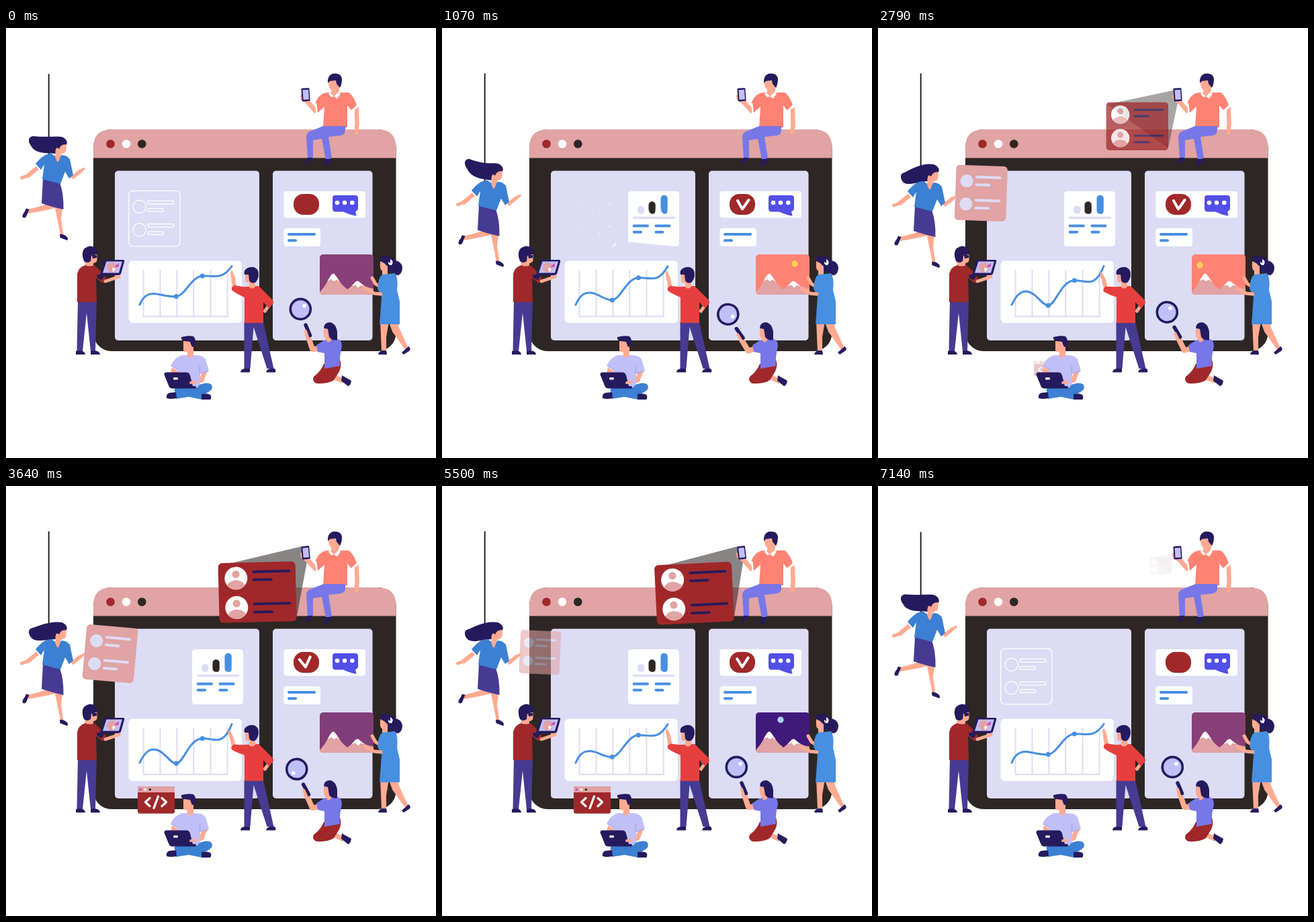
An HTML page that plays this animation: 640 px wide and 640 px high, repeating every 7210 ms.

```html
<!DOCTYPE html>
<html lang="en">
<head>
<meta charset="utf-8">
<title>Team building a dashboard</title>
<style>
html, body { margin: 0; width: 100%; height: 100%; overflow: hidden; background: #fff; }
svg { display: block; width: 100%; height: 100%; }
.ln { fill: none; stroke-linecap: round; stroke-linejoin: round; }
.skin { fill: #ffaa91; } .navy { fill: #261a5e; } .dark { fill: #2d2624; } .pink { fill: #e1a3a4; }
.pale { fill: #dcdcf5; } .wine { fill: #a0282a; } .blue { fill: #478fe0; } .jean { fill: #3b80d2; }
.plum { fill: #473a93; } .lilac { fill: #7777e8; } .coral { fill: #ff8272; } .red { fill: #e63f3d; }
.soft { fill: #c0bff8; } .white { fill: #fff; }
.limb { fill: none; stroke: #ffaa91; stroke-linejoin: round; }
</style>
</head>
<body>
<svg viewBox="0 0 640 640">
  <defs>
    <clipPath id="frame"><rect x="467" y="337" width="80" height="60" rx="5"/></clipPath>
    <clipPath id="disc1"><circle cx="341.500" cy="135" r="17"/></clipPath>
    <clipPath id="disc2"><circle cx="341.500" cy="178.500" r="17"/></clipPath>
  </defs>

  <!-- browser window -->
  <rect class="dark" x="130" y="151" width="450.500" height="330" rx="27"/>
  <path class="pink" d="M130 193.500V178Q130 151 157 151H553.500Q580.500 151 580.500 178V193.500Z"/>
  <circle class="wine" cx="155.500" cy="172.500" r="6.300"/>
  <circle class="white" cx="179" cy="172.500" r="6.300"/>
  <circle class="dark" cx="202.300" cy="172.500" r="6.300"/>
  <rect class="pale" x="162" y="212.500" width="215" height="252.500" rx="5"/>
  <rect class="pale" x="397" y="212.500" width="148.500" height="252.500" rx="5"/>

  <!-- right column -->
  <rect class="white" x="413.500" y="243" width="121.500" height="39.500" rx="4"/>
  <rect class="wine" x="428" y="247" width="38" height="31" rx="14.500"/>
  <path id="check" class="ln" stroke="#fff" stroke-width="4" pathLength="1" d="M440 257L447 269.500L456.500 256"/>
  <path fill="#514fe8" d="M490 249H520Q524 249 524 253V268Q524 272 520 273L521.500 279.500Q515 279 502 273.500H490Q486 273 486 269V253Q486 249 490 249Z"/>
  <g class="white"><circle cx="493" cy="260" r="3.300"/><circle cx="504" cy="260" r="3.300"/><circle cx="515.300" cy="260" r="3.300"/></g>
  <rect class="white" x="413.500" y="298" width="54.500" height="27" rx="4"/>
  <path class="ln" stroke="#478fe0" stroke-width="4" d="M421 307H459M421 316.300H431"/>
  <g clip-path="url(#frame)">
    <rect id="sky" x="467" y="337" width="80" height="60"/>
    <circle id="sun" fill="#ffcf5c" r="4.700"/>
    <circle id="moon" fill="#a9d2f5" r="4.700"/>
    <path class="pink" d="M466 397V394Q471 389 475 383L483 369Q487 362 491 369L497 378Q502 385 508 389Q513 386 519 379Q523 374 527 379Q534 386 548 388V397Z"/>
    <path class="white" d="M478.500 376.500L483 369Q487 362 491 369L497 378L492 374.500L488 377L484 374ZM514.500 384L519 379Q523 374 527 379L533.500 384L528 383L524 386.500L520 382.500Z"/>
  </g>

  <!-- left column -->
  <g id="outline" fill="none" stroke="#fff" stroke-width="1.300"></g>
  <path id="statCard" class="white"/>
  <g id="bars"><path class="pale"/><path class="dark"/><path class="blue"/></g>
  <g id="statText" class="ln" stroke-width="4">
    <path stroke="#dcdcf5" stroke-width="3.300" d="M285.500 282.300H345.500"/>
    <path stroke="#478fe0" d="M285.700 294.500H306M318.500 294.500H338.500M285.700 303.800H296M318.500 303.800H328.500"/>
  </g>
  <rect class="white" x="182.500" y="346.500" width="168.500" height="92.500" rx="6"/>
  <path fill="none" stroke="#dcdcf5" stroke-width="2" d="M204.500 360V430M229.500 360V430M254.500 360V430M279.300 360V430M304.500 360V430M329.700 360V430M203.500 429.300H330.700"/>
  <path id="curve" class="ln" stroke="#478fe0" stroke-width="3"/>
  <circle id="dotA" class="blue" cx="253.300" r="3.500"/>
  <circle id="dotB" class="blue" cx="292.300" r="3.500"/>

  <!-- card in the hand of the hanging woman -->
  <g id="handCard">
    <rect class="pink" x="114" y="202.500" width="76.500" height="82" rx="5.500"/>
    <g class="pale"><circle cx="130.300" cy="226" r="9.600"/><circle cx="130.300" cy="260.300" r="9.600"/></g>
    <path class="ln" stroke="#dcdcf5" stroke-width="4" d="M145 219.500H179.500M145 231H163.500M145 254H179.500M145 265.500H163.500"/>
  </g>

  <!-- hanging woman -->
  <path id="wire" stroke="#222" stroke-width="2"/>
  <g id="hanger">
    <path class="limb" stroke-width="6.500" d="M47 208L31 221"/>
    <path class="limb ln" stroke-width="5" d="M32 220L23.500 223"/>
    <path class="limb" stroke-width="5.500" d="M98 223L112 212"/>
    <path class="limb ln" stroke-width="3.500" d="M111 213L116 209.500"/>
    <path class="skin" d="M56 260L84 266L82 285L85.500 309L81 308L73 268Q58 272 33 276L32 270Q50 266 64 261Z"/>
    <path class="navy" d="M34.500 270L30 281Q27 284 24.500 281Q24 278 28 273L30 268.500ZM80 307Q85 306 91 311Q93 314 91 316L80.500 312Z"/>
    <path class="plum" d="M55 224L80 230Q86 246 85.500 270Q67 266 53 261Z"/>
    <path id="hair" class="navy"/>
    <path class="jean" d="M68 187Q78 196 83 189Q90 189 95 195L100 219L94 224L88 214L81 232L54 225L57 203L52 211L44 202Q57 186 68 187Z"/>
    <path class="skin" d="M89.500 172Q90.500 184 87 186Q82 186.500 81.500 190Q79 198 77 200Q72 193 73.500 188L73.500 180Q75 176 79 179L81 174Z"/>
    <path class="navy" d="M70 165Q82 158 89 166Q92 170 90 173.500Q82 172 79 180Q75 176 74 181L72 187Z"/>
  </g>

  <!-- man with the small laptop -->
  <path class="plum" d="M107 405H135L133 481H126L120 424L114 481H105.500Z"/>
  <path class="navy" d="M104 486V481Q112 479 116 482Q118 484 118 486ZM126 486V481Q134 479 138 482Q140 484 140 486Z"/>
  <path class="skin" d="M118 347H130V355Q123 359 117 354Z"/>
  <path class="skin" d="M122 337H135.500V346Q134 351 126 350Z"/>
  <path class="navy" d="M116 347Q111 334 117 328Q126 321 134 328Q138 333 134 337L127 339L126 347Q121 351 116 347ZM128 338H135V342L129 343Z"/>
  <path class="wine" d="M118 353Q124 356 131 353Q137 356 149 373L144 380L134 372L135 408H106V366Q108 356 118 353Z"/>
  <path class="navy" d="M148 345H175Q177 346 176 348L171 366Q170 368 167 368H143Q138 368 142 362L146 347Q147 345 148 345ZM136 367H147L143 375Q135 373 135 369Z"/>
  <path fill="#c0bff8" d="M149.500 347.500H173L168 364.500H144Z"/>
  <circle class="pink" cx="157.500" cy="356.500" r="7.500"/>
  <path class="white" d="M158 357L163 358Q162 362 159 363Z"/>
  <path fill="#d63fc4" d="M161.500 355L168 350L167.500 356Z"/>
  <path class="limb ln" stroke-width="5" d="M148 377L160 373L168 370"/>

  <!-- code window rising from the laptop -->
  <g id="codeWin">
    <rect class="wine" x="196" y="447" width="55" height="40.500" rx="3"/>
    <path class="pink" d="M196 456V450Q196 447 199 447H248Q251 447 251 450V456Z"/>
    <circle fill="#c84bbb" cx="200.300" cy="451.800" r="1.800"/><circle class="white" cx="207.300" cy="451.800" r="1.800"/><circle class="dark" cx="214.300" cy="451.800" r="1.800"/>
    <path class="ln" stroke="#fff" stroke-width="3.300" d="M214 464.500L207.500 470.500L214 476.500M226.500 462L220 479.500M232 464.500L238.500 470.500L232 476.500"/>
  </g>

  <!-- sitting man with laptop -->
  <path class="jean" d="M253 535L285 532Q299 526 305 530Q308 533 306 538Q300 544 291 546L292 553L272 549L253 552V543Q248 539 253 535Z"/>
  <path class="navy" d="M253 542L254 551Q245 553 239 551Q238 545 243 543ZM291 545Q302 543 305 547Q306 551 304 553H291Z"/>
  <path class="limb ln" stroke-width="7" d="M296 511L291 524L278 529"/>
  <path class="skin" d="M247 505L256 511V515L245 514Z"/>
  <path class="soft" d="M262 487H280Q293 486 297 493L302 510L289 513V530L285 535H262L255 514V508L245 503Q251 490 262 487Z"/>
  <path fill="none" stroke="#a9a7e8" stroke-width="1.500" d="M288.500 502V514L301 511M247 503L256 509"/>
  <path class="skin" d="M264 466H279V487Q276 492 270 489V482Q265 483 264 480Z"/>
  <path class="navy" d="M261 460Q272 457 279 459Q284 463 281 473L277 475L275 470L274 467L265 466Q260 464 261 460Z"/>
  <path class="navy" d="M238 512.500H269Q273 513 274 517L278 533H282Q284 535 282 536.500H247Q243 536 242 532L235.500 516Q235 513 238 512.500Z"/>
  <path class="limb ln" stroke-width="4" d="M275 528L282 527"/>
  <rect class="white" x="249" y="520" width="7" height="3.500" rx="1.500"/>

  <!-- man at the chart -->
  <path class="plum" d="M354.500 437H383Q386 452 398.500 507H388.500L368.500 445L363.500 507H354.500Z"/>
  <path class="navy" d="M349 512.500Q349 508 355 507H363V512.500ZM387 512.500Q388 508 393 507H400Q402 510 401 512.500Z"/>
  <path class="limb" stroke-width="5" d="M393 411L384 423"/>
  <g id="redArm">
    <path class="skin" d="M337 386L334 365Q334 361 337 361L341 372L343 386Z"/>
    <path class="red" d="M336 386L340 383L358 386L359 402Q346 398 336 390Z"/>
  </g>
  <path class="red" d="M358 385L376 384L397 405Q399 408 397 411L391 417L383 408V439H355V402L351 386Z"/>
  <path class="skin" d="M356 367H371V385Q367 390 362 386V379Q357 380 356 376Z"/>
  <path class="navy" d="M355 367Q353 360 360 357Q370 353 375 361Q378 370 372 378Q366 382 362 376L361 367Z"/>

  <!-- kneeling woman -->
  <path class="limb" stroke-width="7" d="M488 519L503 526"/>
  <path class="navy" d="M500 517L514 525Q513 532 509 533L499 525Z"/>
  <path class="wine" d="M473 500L496 492Q501 500 496 511L488 524Q480 530 462 529Q455 526 458 519Q468 512 473 500Z"/>
  <g id="lens">
    <path class="limb ln" stroke-width="8" d="M467 477L456 478L449 457"/>
    <path class="ln" stroke="#261a5e" stroke-width="5.500" d="M446 442L452.500 457.500"/>
    <path class="limb ln" stroke-width="4" d="M446 451L449 460"/>
    <circle fill="#c0bff8" stroke="#261a5e" stroke-width="3.600" cx="438.300" cy="418.400" r="15"/>
  </g>
  <circle id="glint" class="white" r="2.800"/>
  <path class="lilac" d="M473 465Q483 461 492 463Q500 463 500 474Q496 488 497 503L474 507V484L464 482L462 472Z"/>
  <path class="skin" d="M473 448H484V465Q479 471 476 463Q472 460 473 448Z"/>
  <path class="navy" d="M473 447Q473 438 483 438Q491 440 493 452V464Q486 466 481 460L479 448Z"/>

  <!-- woman at the picture -->
  <path class="skin" d="M557 436H570L566 460V482H559ZM570 438H583L585 446L599 477L595 480L575 452Z"/>
  <path class="navy" d="M554 486Q555 481 560 480H566L567 486ZM589 483L599 474Q603 476 601 480L592 486Z"/>
  <path class="limb ln" stroke-width="5" d="M558 386L550 381L545 372"/>
  <path class="navy" d="M557 346Q556 338 566 339Q576 341 579 346Q588 347 590 356Q590 365 584 368Q577 368 574 361L566 365L561 351Z"/>
  <path class="skin" d="M557 347L563 350L568 355V367Q565 372 560 369V361Q556 361 557 347Z"/>
  <path class="white" d="M572 344Q578 347 574 353Q568 353 569 348L572 350Z"/>
  <path class="blue" d="M560 367L579 365Q584 372 582 390L586 407V441H556L559 400L553 388Q554 371 560 367Z"/>
  <path class="limb ln" stroke-width="5" d="M558 396L548 395L535 388"/>

  <!-- phone projection -->
  <g id="beam"><path class="dark" opacity=".56" d="M440 90L317 116L430 197L449 107Z"/></g>
  <g id="phoneCard">
    <rect class="wine" x="315.300" y="112" width="115" height="89" rx="6"/>
    <g class="white"><circle cx="341.500" cy="135" r="17"/><circle cx="341.500" cy="178.500" r="17"/></g>
    <g class="pink">
      <circle cx="341.500" cy="129" r="5.600"/><ellipse clip-path="url(#disc1)" cx="341.500" cy="149" rx="14" ry="11"/>
      <circle cx="341.500" cy="172.500" r="5.600"/><ellipse clip-path="url(#disc2)" cx="341.500" cy="192.500" rx="14" ry="11"/>
    </g>
    <path class="ln" stroke="#261a5e" stroke-width="3.800" d="M368 126H420.500M368 138H394M368 174H420.500M368 186H394"/>
  </g>

  <!-- man with phone -->
  <path class="limb" stroke-width="7" d="M462 125L449 110"/>
  <path class="limb ln" stroke-width="4" d="M449 112L441 106L440 101"/>
  <g id="phone">
    <rect class="navy" x="440" y="89.500" width="12" height="19.500" rx="1.500" transform="rotate(-4 446 99)"/>
    <rect class="soft" x="442" y="92" width="8.500" height="14.500" transform="rotate(-4 446 99)"/>
  </g>
  <path class="limb ln" stroke-width="6.500" d="M522 121L522.500 143L521.500 155"/>
  <path class="coral" d="M480 96H510Q515 98 522 114L514 123L508 115V148H472L474 117L463 127L460 113Q466 96 480 96Z"/>
  <path fill="none" stroke="#fff" stroke-width="2.500" d="M514 123L523 117.500M461 112L463 128"/>
  <path class="white" d="M482 95L488 102L496 94L498 98L493 105L488 102L484 103L480 98Z"/>
  <path class="skin" d="M480 79L492 78L496 80V94L488 102L484 95V91Q480 91 480 79Z"/>
  <path class="navy" d="M479 82Q478 71 486 68Q498 66 500 75Q500 84 497 89L492 83L491 78L482 79Z"/>
  <path class="lilac" d="M472 146H505V153Q504 159 498 160L480 162L485 194L476 196L470 165L457 167V194H449L447 162Q447 157 452 154Z"/>
  <path class="navy" d="M449 193H456Q455 199 446 203Q444 201 449 193ZM476 195H485Q484 201 475 207Q473 204 476 195Z"/>
</svg>
<script>
const LOOP = 7210, STEP = LOOP / 101;
const $ = id => document.getElementById(id);
const set = (el, attrs) => { for (const k in attrs) el.setAttribute(k, attrs[k]); };
const clamp = v => Math.max(0, Math.min(1, v));
const mix = (a, b, k) => a + (b - a) * k;

// ease in and out with the given power
function ease(u, power) {
  u = clamp(u);
  const half = v => Math.pow(2 * v, power) / 2;
  return u < .5 ? half(u) : 1 - half(1 - u);
}
const span = (t, from, to, power = 2) => ease((t - from) / (to - from), power);
// fades in over a..b and out over c..d
const between = (t, a, b, c, d, power) => span(t, a, b, power) - span(t, c, d, power);

function track(t, keys, power = 1) {
  let i = 0;
  while (i < keys.length - 2 && t > keys[i + 1][0]) i++;
  const [t0, a] = keys[i], [t1, b] = keys[i + 1];
  return mix(a, b, ease((t - t0) / (t1 - t0), power));
}

const TRACKS = {
  hair: [[0, 0], [450, -9], [1070, -6], [1800, 9], [2790, 13], [3640, 9], [4300, 11], [4710, 9], [5400, 11], [6140, 11], [7210, 0]],
  lens: [[0, 0], [1000, -12.4], [2400, -12.4], [2790, -7.7], [3640, -5.3], [4710, 0], [7210, 0]],
  glint: [[0, -40], [1070, 23], [2790, 309], [3640, 490], [4710, 680], [7210, 680]],
  curve: [[0, 0], [400, 0], [1070, .4], [1900, 1], [3640, 1], [4710, .88], [5950, 0], [7210, 0]],
  sky: [[0, .42], [100, .42], [800, 1], [3180, 1], [3930, 0], [5300, 0], [6140, .29], [6700, .42], [7210, .42]],
  check: [[0, 0], [2790, 0], [3640, 1], [4710, 1], [5900, 0]],
  handTilt: [[1200, 0], [2790, 2], [3640, 5], [4710, 0], [5800, 3]],
  phoneTilt: [[0, 0], [2790, 0], [3640, -1.4], [4710, -5.2], [6140, -1], [6800, 0], [7210, 0]]
};

// rounded box traced clockwise from its lower right corner
const box = (x, y, w, h, r) => `M${x + w} ${y + h - r}a${r} ${r} 0 0 1 ${-r} ${r}h${2 * r - w}` +
  `a${r} ${r} 0 0 1 ${-r} ${-r}v${2 * r - h}a${r} ${r} 0 0 1 ${r} ${-r}h${w - 2 * r}a${r} ${r} 0 0 1 ${r} ${r}Z`;

const outlines = [box(182.700, 242.300, 76.300, 82.500, 6)];
for (const y of [266, 300.300]) {
  outlines.push(box(189, y - 9.700, 19.400, 19.400, 9.700), box(211, y - 8.600, 39, 4.600, 2.200), box(211, y + 2.800, 23.500, 4.400, 2.200));
}
$('outline').innerHTML = outlines.map(d => `<path pathLength="1" d="${d}"/>`).join('');

const barSizes = [[291, 12], [307.500, 18.500], [325.500, 28]];
function barPath([x, h], grow) {
  const w = 10.300, r = 5, base = 276.700, top = base - h * clamp(grow * 1.12);
  const round = Math.pow(grow, 8), tall = Math.max(base - top, 2 * r);
  return `M${x} ${base - tall + r}a${w / 2} ${r} 0 0 1 ${w} 0L${x + w * mix(.9, 1, round)} ${base - r}` +
    `Q${x + w * mix(.85, 1, round)} ${base} ${x + w * .6} ${base}Q${x + w * .4 * (1 - round)} ${base} ${x} ${base - mix(tall - r, r, round)}Z`;
}

function statPath(grow) {
  const right = 243 + 82 * clamp(grow * 1.15), left = 243 + 82 * Math.pow(grow, 2.5);
  const r = Math.min(5, (right - 243) / 2), l = Math.min(5, (left - 243) / 2), c = 5 * Math.pow(grow, 20);
  return `M277 ${243 + l}Q277 243 ${277 + l} 243H${353 - r}Q353 243 353 ${243 + r}V${right - r}` +
    `Q353 ${right} ${353 - r} ${right - r * .1 * (1 - grow)}L${277 + c} ${left}Q277 ${left} 277 ${left - c}Z`;
}

const hairPath = h => `M90 173C91 165 84 161 75 161.500C63 162 52 ${162 + h * .4} 40 ${161 + h}` +
  `C32 ${162 + h} 33 ${170 + h} 37 ${175 + h}C43 ${187 + h * .6} 58 ${186 + h * .2} 74 187C78 178 80 181 90 173Z`;

const chartLow = k => mix(399.600, 413, k), chartHigh = k => mix(369, 375.700, k);
function curvePath(k) {
  const m = (a, b) => mix(a, b, k), low = chartLow(k), high = chartHigh(k);
  return `M199 412C${m(204, 206)} ${m(399, 398)} 211 ${m(395, 392)} 221 ${m(395.500, 392)}` +
    `C${m(232, 235)} ${m(396.500, 393)} ${m(241, 244)} ${m(400.500, 413)} 253.300 ${low}` +
    `C${m(267, 264)} ${m(398, 413)} ${m(276, 273)} ${m(370, 375.500)} 292.300 ${high}C${m(309, 308)} ${m(368, 375)} ${m(321, 323)} ${m(376, 389)} 336 354.500`;
}

const scaleAt = (x, y, s) => `translate(${x} ${y}) scale(${s}) translate(${-x} ${-y})`;

function orb(id, t, start) {
  const x = 525 - .0268 * (t - start);
  set($(id), { cx: x, cy: 348 + .0075 * (x - 505) ** 2 });
}

function draw(t) {
  const at = (name, power) => track(t, TRACKS[name], power);
  const down = between(t, 0, 1500, 5570, 7100, 5);

  set($('hanger'), { transform: `translate(0 ${41 * down})` });
  set($('wire'), { d: `M63.700 ${68.500 - down}V${192 + 41 * down}` });
  set($('hair'), { d: hairPath(at('hair', 1.500)) });

  for (const path of $('outline').children) {
    set(path, { 'stroke-dasharray': down < .001 ? 'none' : `${1 - down} 2` });
  }
  set($('statCard'), { d: statPath(down) });
  [...$('bars').children].forEach((bar, i) => set(bar, { d: barPath(barSizes[i], down) }));
  const shown = clamp(down * 2.500 - 1);
  set($('bars'), { opacity: shown });
  set($('statText'), { opacity: shown });
  const tip = at('check', 2);
  set($('check'), {
    'stroke-dasharray': `${clamp(down * 1.120)} 2`,
    opacity: down > .01 ? 1 : 0,
    transform: `translate(${-2.500 * tip} 0) rotate(${-10 * tip} 447 262)`
  });

  const k = at('curve', 1.500);
  set($('curve'), { d: curvePath(k) });
  set($('dotA'), { cy: chartLow(k) });
  set($('dotB'), { cy: chartHigh(k) });
  set($('redArm'), { transform: `rotate(${-7 * k} 354 393)` });

  const day = at('sky'), night = [50, 17, 124], noon = [255, 130, 114];
  set($('sky'), { fill: `rgb(${night.map((v, i) => Math.round(mix(v, noon[i], day)))})` });
  orb('sun', t, 1070);
  orb('moon', t, 4710);

  const turn = at('lens', 1.500), a = turn * Math.PI / 180, g = at('glint') * Math.PI / 180;
  set($('lens'), { transform: `rotate(${turn} 468 480)` });
  const cx = 468 - 29.700 * Math.cos(a) + 61.600 * Math.sin(a), cy = 480 - 29.700 * Math.sin(a) - 61.600 * Math.cos(a);
  set($('glint'), { cx: cx + 7.600 * Math.cos(g), cy: cy + 7.600 * Math.sin(g) });

  const held = between(t, 1250, 2000, 5150, 5900);
  set($('handCard'), { opacity: held, transform: `rotate(${at('handTilt', 2)} 83 278) ${scaleAt(116, 250, mix(.5, 1, held))}` });

  const code = between(t, 2330, 3600, 5500, 6850);
  set($('codeWin'), { opacity: code, transform: scaleAt(282, 561, mix(.435, 1, code)) });

  const cast = between(t, 2430, 2985, 6710, 7210), tilt = at('phoneTilt', 1.500);
  const thrown = { opacity: cast, transform: `rotate(${tilt} 439 104) ${scaleAt(439, 104, mix(.25, 1, cast))}` };
  set($('phoneCard'), thrown);
  set($('beam'), thrown);
  set($('phone'), { transform: `rotate(${tilt} 446 99)` });
}

const start = performance.now();
function tick() {
  const t = (performance.now() - start) % LOOP;
  draw(Math.floor((t + 1) / STEP) * STEP % LOOP);
  requestAnimationFrame(tick);
}
tick();
</script>
</body>
</html>
```
